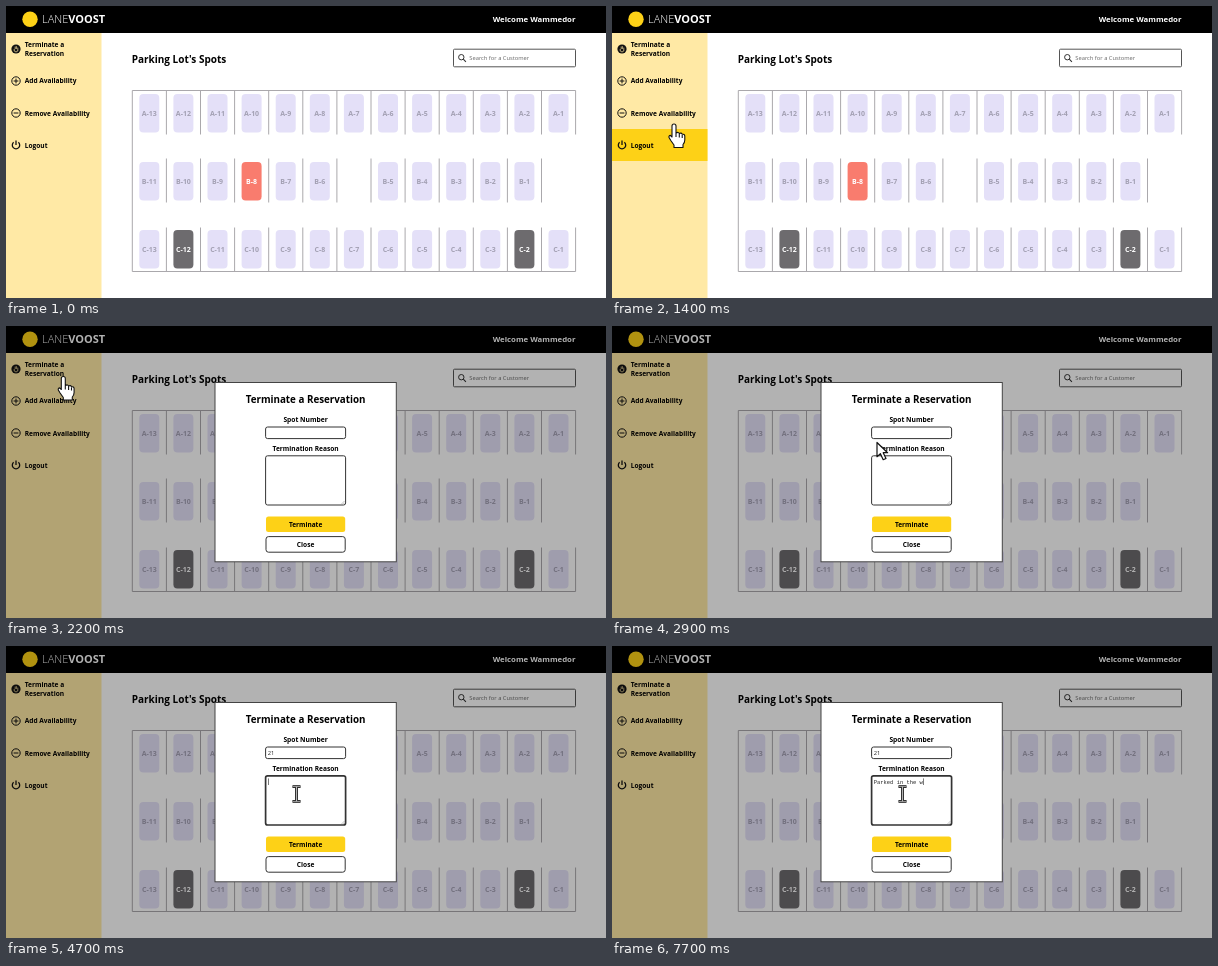
These frames come from a looping animation (600x292 px, 8000 ms). An HTML page:

```html
<!DOCTYPE html>
<html lang="en">
<head>
<meta charset="utf-8">
<title>Parking lot reservations</title>
<style>
  html, body { margin: 0; width: 100%; height: 100%; overflow: hidden; background: #fff; }
  svg { display: block; width: 100%; height: 100%; }
  text { font-family: "Open Sans", "Noto Sans", sans-serif; white-space: pre; }
  .mono { font-family: "Liberation Mono", "DejaVu Sans Mono", monospace; }
</style>
</head>
<body>
<svg id="stage" viewBox="0 0 600 292"></svg>
<script>
const LOOP = 8000, STEP = 100;
const YELLOW = '#fdd117';
const COLUMN = 34.1, LOT_LEFT = 126.3;

const rect = (x, y, w, h, fill, extra = '') =>
  `<rect x="${x}" y="${y}" width="${w}" height="${h}" fill="${fill}" ${extra}/>`;
const path = (d, color = '#111', width = 1, fill = 'none') =>
  `<path d="${d}" stroke="${color}" stroke-width="${width}" fill="${fill}" stroke-linejoin="round"/>`;
const label = (x, y, words, size, extra = '') =>
  `<text x="${x}" y="${y}" font-size="${size}" font-weight="700" ${extra}>${words}</text>`;
const centered = (x, y, words, size, extra = '') =>
  label(x, y, words, size, 'text-anchor="middle" ' + extra);
const circle = (x, y, r, fill, stroke = 'none') =>
  `<circle cx="${x}" cy="${y}" r="${r}" fill="${fill}" stroke="${stroke}"/>`;

function header() {
  return rect(0, 0, 600, 27, '#000') + circle(24, 13.2, 7.7, YELLOW) +
    `<text x="36" y="17" font-size="11" fill="#fff"><tspan font-weight="300">LANE</tspan><tspan font-weight="700">VOOST</tspan></text>` +
    label(569.5, 16.3, 'Welcome Wammedor', 7.8, 'fill="#fff" text-anchor="end"');
}

function sidebar() {
  const icons =
    circle(10, 43, 4.6, '#111') +
    path('M8.2 43v2q1.8 2 3.6 0v-3.4M9.2 43v-2.5M10.4 43v-2.8', '#ffe9a5', .7) +
    circle(10, 75, 4.2, 'none', '#111') + path('M7.6 75h4.8M10 72.6v4.8') +
    circle(10, 107, 4.2, 'none', '#111') + path('M7.6 107h4.8') +
    path('M7.6 136.3a3.7 3.7 0 1 0 4.8 0M10 134.6v4.4', '#111', 1.3);
  const words = [[41, 'Terminate a'], [50.3, 'Reservation'], [77.4, 'Add Availability'],
    [109.5, 'Remove Availability'], [141.5, 'Logout']];
  return rect(0, 27, 95.5, 265, '#ffe9a5') + rect(0, 27, 95.5, 32, YELLOW, 'id="hover"') +
    icons + words.map(([y, s]) => label(18.7, y, s, 6.6)).join('');
}

function spot(column, top, name) {
  const fill = { 'B-8': '#f97c6e', 'C-12': '#6d6b6e', 'C-2': '#6d6b6e' }[name];
  const x = LOT_LEFT + COLUMN * column + 7;
  return rect(x, top, 20, 38.5, fill || '#e4e0f8', 'rx="4"') +
    centered(x + 10, top + 21.8, name, 7, `fill="${fill ? '#fff' : '#a3a0b3'}"`);
}

function lot() {
  const rows = [
    { letter: 'A', top: 88, line: 84.5, count: 13 },
    { letter: 'B', top: 156, line: 152.5, count: 11, gap: 6 },
    { letter: 'C', top: 224, line: 221.5, count: 13 },
  ];
  let lines = `M569.6 84.5H${LOT_LEFT}V265.5H569.6`, spots = '';
  for (const { letter, top, line, count, gap } of rows) {
    const width = gap ? count + 1 : count;
    for (let c = 1; c <= width; c++) lines += `M${LOT_LEFT + COLUMN * c} ${line}v44`;
    for (let c = 0, n = count; n > 0; c++) if (c !== gap) spots += spot(c, top, `${letter}-${n--}`);
  }
  return path(lines, '#aaa8ac', 1) + spots;
}

function search() {
  return rect(447.5, 43.2, 122, 17.6, '#fff', 'stroke="#555" rx="1"') +
    circle(455.3, 51.2, 2.7, 'none', '#333') + path('M457.3 53.2l2.6 2.6', '#333', 1.1) +
    label(463.3, 54.2, 'Search for a Customer', 5.75, 'fill="#666" style="font-weight:400"');
}

function modal() {
  return `<g id="modal">` + rect(0, 0, 600, 292, '#000', 'opacity=".3"') +
    rect(209, 56.5, 181.3, 179.3, '#fff', 'stroke="#444"') +
    centered(299.6, 76.6, 'Terminate a Reservation', 9.8) +
    centered(299.6, 96, 'Spot Number', 6.7) +
    rect(259.6, 101, 80, 11.6, '#fff', 'id="field" stroke="#333" rx="2"') +
    centered(299.6, 125, 'Termination Reason', 6.6) +
    rect(259.6, 129.8, 80, 49.2, '#fff', 'id="area" stroke="#333" rx="2"') +
    path('M335.5 178l3-3M337.3 178l1.2-1.2', '#888', .5) +
    rect(260, 190.6, 79.2, 15.4, YELLOW, 'rx="2.5"') + centered(299.6, 200.7, 'Terminate', 6.5) +
    rect(260, 210.6, 79.2, 15.6, '#fff', 'stroke="#333" rx="2.5"') + centered(299.6, 221, 'Close', 6.6) +
    `<text id="number" x="261.8" y="108.9" font-size="5.8" fill="#222"></text>` +
    `<text id="reason" class="mono" x="261.8" y="138" font-size="5.45" fill="#222"></text>` +
    rect(0, 0, .6, 6.6, '#222', 'id="caret"') + `</g>`;
}

// Each pointer shape has its hot spot at 0,0.
const pointers = {
  hand: path('M-2 2Q-2 0 0 0Q2 0 2 2V9Q4.5 7.6 5.3 9.5Q7.4 8.4 8.2 10.3Q10.6 9.7 10.8 12V16Q10.8 18.5 9 20.5V23.5H0V21Q-1.5 19-3.2 16.5L-5 13.5Q-5.4 11.5-3.6 11.4L-2 13ZM2 9v4M5.3 10v3.4M8.2 11v3', '#111', 1.1, '#fff'),
  arrow: path('M0 0V14.2L3.4 11.2L6.2 17.2L9 16L6.2 10.2H10.6Z', '#111', 1.2, '#fff'),
  beam: path('M-4-7.3H4M0-7.3V7.3M-4 7.3H4', '#111', 2.7) + path('M-3.5-7.3H3.5M0-7.3V7.3M-3.5 7.3H3.5', '#ddd', .8),
};

const stage = document.getElementById('stage');
stage.innerHTML = rect(0, 0, 600, 292, '#fff') + sidebar() + header() +
  label(125.7, 56.6, "Parking Lot's Spots", 10) + search() + lot() + modal() +
  Object.entries(pointers).map(([id, shape]) => `<g id="${id}">${shape}</g>`).join('');

const $ = id => document.getElementById(id);
const show = (id, visible) => $(id).setAttribute('visibility', visible ? 'inherit' : 'hidden');
const set = (id, attributes) => {
  for (const key in attributes) $(id).setAttribute(key, attributes[key]);
};

const route = [[500, 4, 112], [800, 38, 132], [1100, 64, 149], [1300, 66, 149], [1400, 62, 118],
  [1500, 60, 95], [1600, 59, 78], [1700, 58, 66], [1800, 57.6, 58], [2000, 57.3, 50.5],
  [2400, 57.3, 50.5], [2600, 150, 88], [2800, 252, 115], [2900, 265, 116.5], [3200, 277, 109],
  [4300, 277, 109], [4500, 288, 142], [4600, 290.5, 148]];
const numberTimes = [4100, 4300];
const reason = 'Parked in the w';
const reasonTimes = [5300, 5500, 5800, 6000, 6100, 6300, 6400, 6600, 6800,
  7000, 7100, 7200, 7300, 7400, 7700];

function pointerAt(t) {
  const next = route.findIndex(([time]) => time > t);
  if (next < 1) return next ? route.at(-1).slice(1) : route[0].slice(1);
  const [t0, x0, y0] = route[next - 1], [t1, x1, y1] = route[next];
  const k = (t - t0) / (t1 - t0);
  return [x0 + (x1 - x0) * k, y0 + (y1 - y0) * k];
}

const typed = (times, t) => times.filter(time => time <= t).length;

function draw(t) {
  const open = t >= 2200, inField = t >= 3200 && t < 4600, inArea = t >= 4600;

  // The menu highlight trails the pointer by one step.
  const row = Math.floor((pointerAt(t - STEP)[1] - 27) / 32);
  show('hover', t >= 600 && !open);
  set('hover', { y: 27 + 32 * row });

  show('modal', open);
  set('field', { 'stroke-width': inField ? 1.7 : 1 });
  set('area', { 'stroke-width': inArea ? 1.7 : 1 });
  const digits = typed(numberTimes, t), letters = typed(reasonTimes, t);
  $('number').textContent = '21'.slice(0, digits);
  $('reason').textContent = reason.slice(0, letters);

  const blinkedOff = (t >= 3700 && t < 4100) || (t >= 5100 && t < 5300);
  show('caret', (inField || inArea) && !blinkedOff);
  set('caret', inArea ? { x: 262 + 3.27 * letters, y: 132.4 } : { x: 262 + 3.31 * digits, y: 103.4 });

  const shape = t < 500 ? '' : t < 2500 ? 'hand' : t < 3100 ? 'arrow' : 'beam';
  const [x, y] = pointerAt(t);
  for (const id in pointers) {
    show(id, id === shape);
    set(id, { transform: `translate(${x} ${y})` });
  }
}

function frame() {
  draw(Math.floor(performance.now() % LOOP / STEP) * STEP);
  requestAnimationFrame(frame);
}
frame();
</script>
</body>
</html>
```
